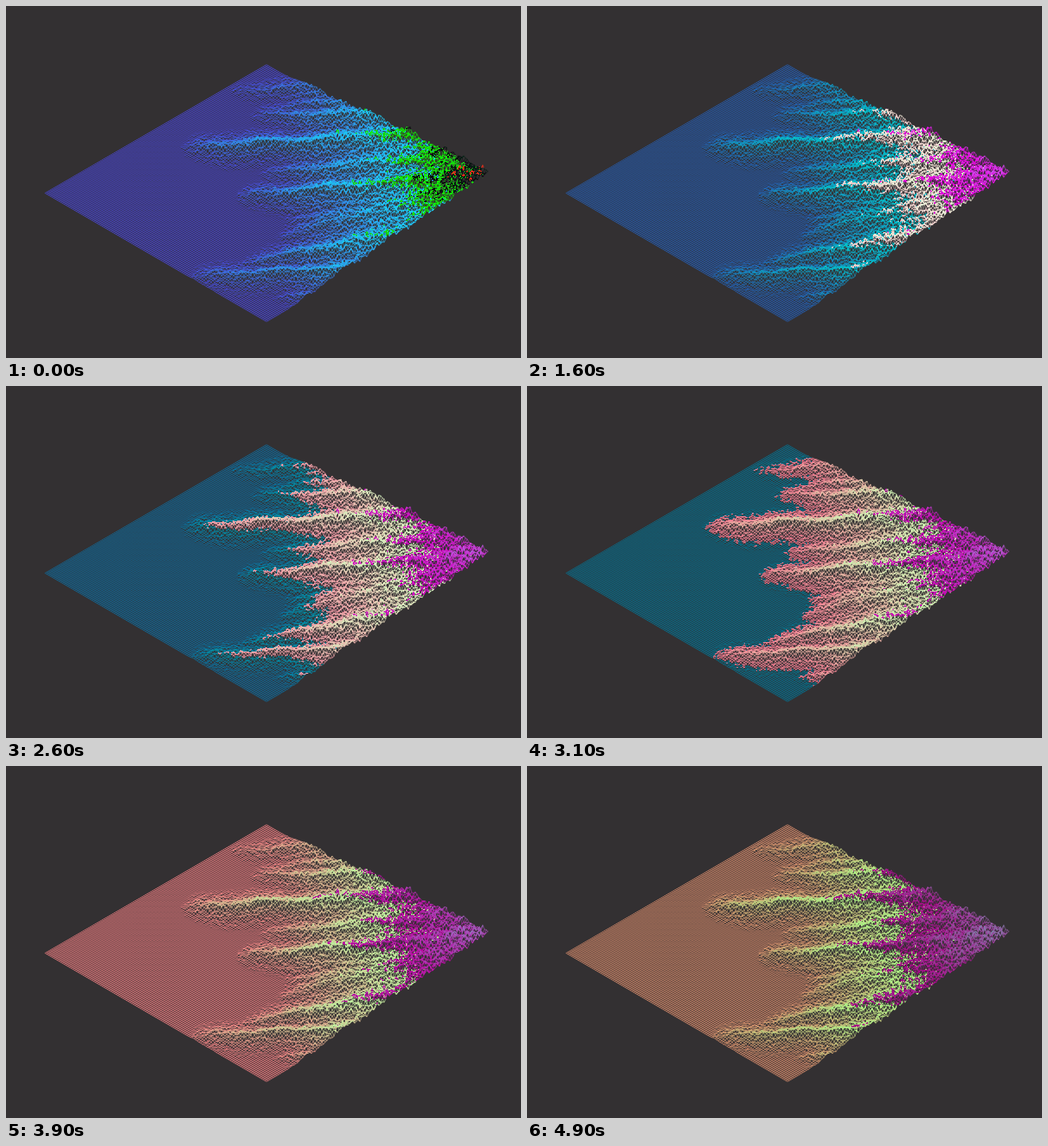
A matplotlib script that plays this animation: 600 px wide and 411 px high, repeating every 5 s.

```python
import numpy as np
import matplotlib.pyplot as plt
from matplotlib.animation import FuncAnimation

W, H, DPI = 600, 411, 64
FRAMES, INTERVAL = 50, 100
CELLS = 128
LIFT = 28                      # pixels of rise for height 1
BACKGROUND = np.array([51, 48, 50]) / 255

# Main ridges: start x, start y, crest height, slope
RIDGES = [(252, 99, .25, 0), (280, 128, .42, .08), (200, 167, .54, 0),
          (290, 197, .42, 0), (264, 223, .54, 0), (308, 271, .32, -.17),
          (268, 302, .50, -.10), (208, 317, .42, 0)]


def ridge(x, y, x0, y0, crest, slope, width=9):
    """A crest that climbs from its tip toward the right."""
    run = np.maximum(x - x0, 0)
    line = y0 + slope * run + 1.5 * np.sin(run / 14 + y0)
    return crest * (1 - np.exp(-run / 65)) * np.exp(-np.abs(y - line) / width)


def terrain(x, y):
    rng = np.random.default_rng(7)
    ramp = .85 * np.clip((x - 320) / 230, 0, 1.1) ** 1.2
    crests = [ridge(x, y, *key) for key in RIDGES]
    for y0 in np.linspace(80, 355, 22):
        start = 285 + rng.uniform(0, 70)
        crests.append(ridge(x, y, start, y0, rng.uniform(.12, .32), 0, 5))
    lift = np.maximum(np.max(crests, axis=0) - .02, 0)
    height = ramp + lift * (1 - ramp)
    height += .1 * np.sqrt(height) * rng.standard_normal(x.shape)
    return np.clip(height, 0, 1.06)


def sample_edges(a, b, steps=8):
    """Points along each mesh edge: x, y, height, depth and length."""
    f = (np.arange(steps) + .5) / steps
    points = a[..., None] * (1 - f) + b[..., None] * f
    length = np.hypot(*(b - a)[:2]) / steps
    weights = np.broadcast_to(length[..., None], points[0].shape)
    return np.vstack([points.reshape(4, -1), weights.reshape(1, -1)])


def rasterize():
    """Wire coverage and height for every pixel of the stage."""
    i, j = np.meshgrid(np.arange(CELLS + 1), np.arange(CELLS + 1))
    x = 45 + (i + j) * 258 / CELLS
    base = 218 + (j - i) * 150 / CELLS
    z = terrain(x, base)
    mesh = np.stack([x, base - LIFT * z, z, base])
    points = np.hstack([sample_edges(mesh[:, :, :-1], mesh[:, :, 1:]),
                        sample_edges(mesh[:, :-1], mesh[:, 1:])])
    x, y, z, depth, length = points[:, np.argsort(points[3], kind="stable")]

    cover, total = np.zeros((H, W)), np.zeros((H, W))
    x0, y0 = np.floor(x).astype(int), np.floor(y).astype(int)
    fx, fy = x - x0, y - y0
    for dx, wx in ((0, 1 - fx), (1, fx)):
        for dy, wy in ((0, 1 - fy), (1, fy)):
            weight = wx * wy * length
            np.add.at(cover, (y0 + dy, x0 + dx), weight)
            np.add.at(total, (y0 + dy, x0 + dx), weight * z)
    height = total / np.maximum(cover, 1e-9)
    # The nearest wire wins
    height[np.rint(y).astype(int), np.rint(x).astype(int)] = z
    return np.clip(.56 * cover, 0, .95)[..., None], height


cover, height = rasterize()


def render(frame):
    t = frame * INTERVAL / 1000
    # Each channel drifts with time and wraps around on its own
    wires = np.stack([.29 - .09 * t - .3 * height,
                      .28 + .055 * t + .9 * height,
                      .84 - .085 * t + .25 * height], axis=-1) % 1
    return BACKGROUND * (1 - cover) + wires * cover


fig = plt.figure(figsize=(W / DPI, H / DPI), dpi=DPI, facecolor=BACKGROUND)
ax = fig.add_axes([0, 0, 1, 1])
ax.axis("off")
image = ax.imshow(render(0), interpolation="nearest", aspect="auto")


def update(frame):
    image.set_data(render(frame))
    return [image]


anim = FuncAnimation(fig, update, frames=FRAMES, interval=INTERVAL,
                     repeat=True, repeat_delay=0)
plt.show()
```
